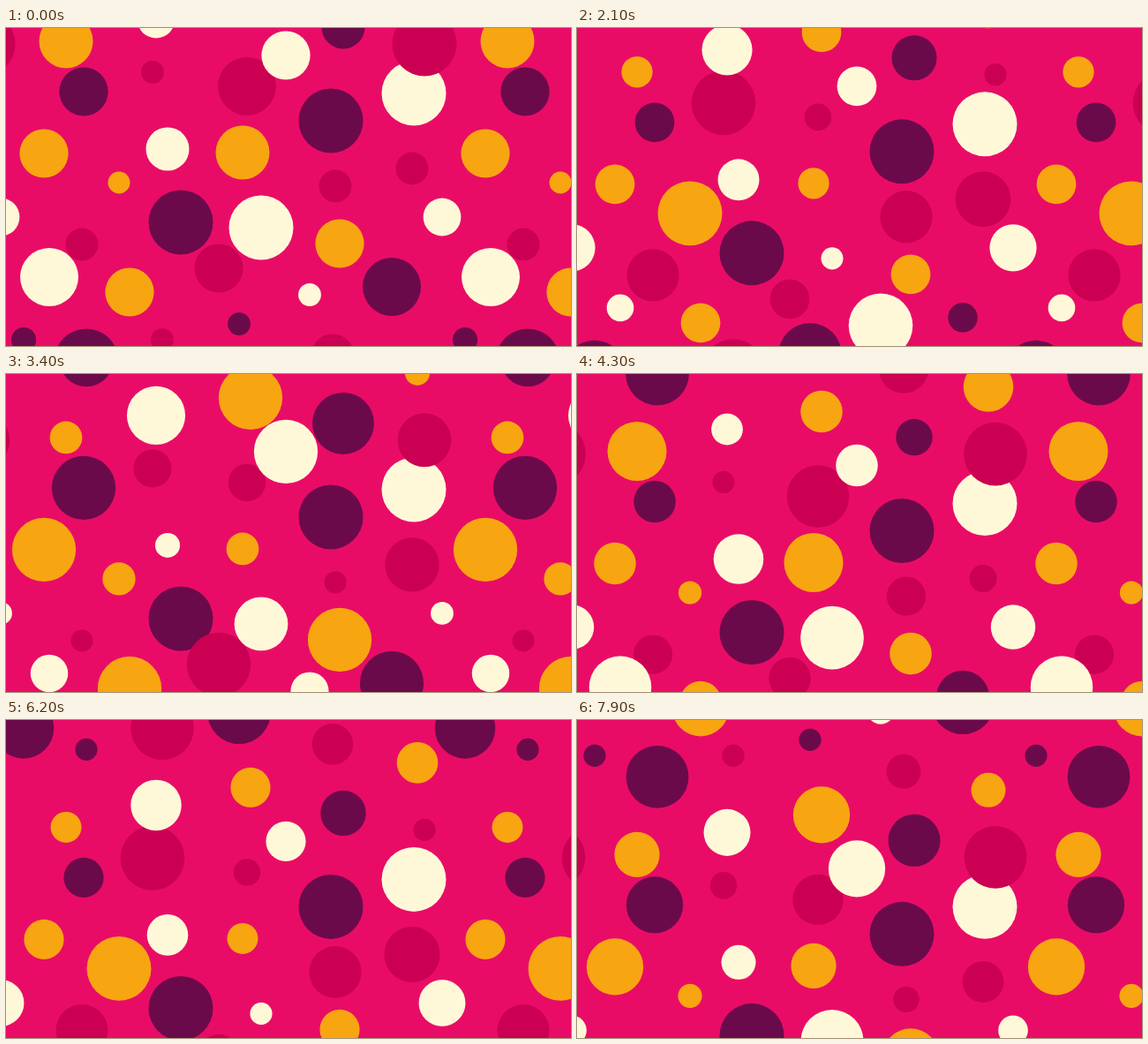
Write an HTML page with a canvas that moves like this. It is 640x360 px and loops after 8000 ms.

```html
<!DOCTYPE html>
<html lang="en">
<head>
<meta charset="utf-8">
<title>Falling dots</title>
<style>
  html, body { margin: 0; width: 100%; height: 100%; overflow: hidden; background: #e90c67; }
  canvas { display: block; width: 640px; height: 360px; }
</style>
</head>
<body>
<canvas id="stage" width="640" height="360"></canvas>
<script>
const ctx = document.getElementById('stage').getContext('2d');
const { sin, cos, floor, PI } = Math;
const TURN = 2 * PI;

const LOOP = 8000, STEP = 100;            // ms
const TILE_W = 500, TILE_H = 450;         // the pattern repeats at this size
const FALL = 17.4, LAG = 2.3;             // px per second, px
const PERIOD = 4.09, BEATS = 24;          // one pulse in seconds, split into beats
const MID = 24.5, SWING = 12;             // radius = MID ± SWING

const PINK = '#e90c67', PLUM = '#6b0a4b', ORANGE = '#f8a512', ROSE = '#cb0053', CREAM = '#fff8d8';

// Back to front: each colour has dots [x, y] grouped by the beat of their largest size.
const layers = [
  [PLUM, {
    steady: [[368, 105], [198, 220]],
    0: [[91, 377]], 10: [[20, 353]], 11: [[264, 335]],
    18: [[382, -1]], 19: [[88, 72]], 21: [[437, 293]]
  }],
  [ORANGE, {
    4: [[68, 15], [268, 141]], 6: [[466, -58]], 12: [[128, 175]],
    19: [[43, 142], [378, 244], [140, 299], [277, -30]]
  }],
  [ROSE, {
    3: [[273, 66]], 6: [[370, 371]], 8: [[373, 179], [86, 245]],
    11: [[177, 353]], 13: [[166, 50]], 16: [[460, 159]], 19: [[241, 272]]
  }],
  [CREAM, {
    steady: [[462, 74]],
    0: [[289, 226]], 3: [[49, 282]], 6: [[183, 137]], 7: [[494, 214]],
    13: [[344, 302]], 17: [[170, -10]], 19: [[317, 31]]
  }],
  [ROSE, { 0: [[474, 18]] }]
];

function radius(beat, s) {
  const swell = beat === 'steady' ? 1 : cos(TURN * (s / PERIOD - beat / BEATS));
  return MID + SWING * swell;
}

function wrap(y) {
  const margin = 45;
  return (y + margin + TILE_H) % TILE_H - margin;
}

function dot(x, y, r) {
  ctx.beginPath();
  ctx.arc(x, y, r, 0, TURN);
  ctx.fill();
}

function draw(ms) {
  const s = ms / 1000;
  const fallen = FALL * s - LAG * sin(PI * ms / LOOP);
  ctx.fillStyle = PINK;
  ctx.fillRect(0, 0, 640, 360);
  for (const [color, groups] of layers) {
    ctx.fillStyle = color;
    for (const beat in groups) {
      const r = radius(beat, s);
      for (const [x, y] of groups[beat]) {
        for (const shift of [-TILE_W, 0, TILE_W]) dot(x + shift, wrap(y + fallen), r);
      }
    }
  }
}

const start = performance.now();
function tick() {
  const t = (performance.now() - start) % LOOP;
  draw(floor(t / STEP) * STEP);
  requestAnimationFrame(tick);
}
tick();
</script>
</body>
</html>
```
